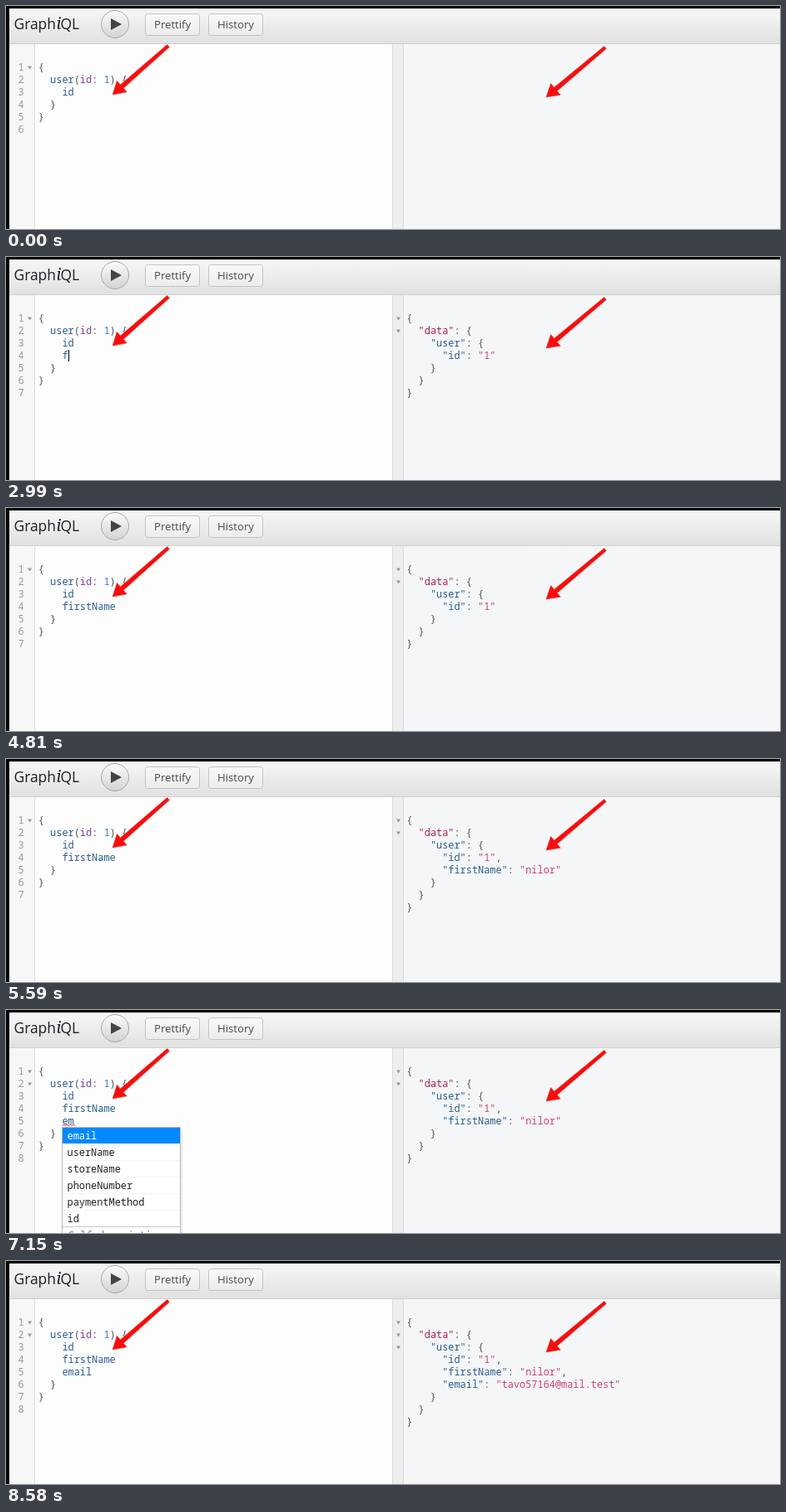
Animation of 930 by 269 pixels, one loop 9.23 s. Source, as an HTML page:

```html
<!DOCTYPE html>
<html lang="en">
<head>
<meta charset="utf-8">
<title>GraphiQL query demo</title>
<style>
  html, body { margin: 0; width: 100%; height: 100%; overflow: hidden; background: #000; }
  svg { display: block; width: 930px; height: 269px; }
  text { white-space: pre; }
  .ui { font: 13.2px "Open Sans", sans-serif; fill: #4a4a4a; }
  .logo { font: 17.4px "Open Sans", sans-serif; fill: #1d2029; }
  .logo .i { font: italic 19px "Noto Serif", serif; }
  .code { font: 11.92px "Noto Sans Mono", monospace; fill: #555; }
  .number { fill: #999; }
  .field { fill: #2b5c8e; }
  .attr { fill: #7f449f; }
  .int { fill: #3f78c0; }
  .root { fill: #ad1f50; }
  .string { fill: #cf4070; }
  .hint { fill: #222; }
  .active { fill: #fff; }
  .info { fill: #777; }
</style>
</head>
<body>
<svg viewBox="0 0 930 269">
  <defs>
    <linearGradient id="bar" x2="0" y2="1"><stop stop-color="#f6f6f6"/><stop offset="1" stop-color="#e1e1e1"/></linearGradient>
    <linearGradient id="round" x2="0" y2="1"><stop stop-color="#fbfbfb"/><stop offset="1" stop-color="#d2d3d6"/></linearGradient>
    <linearGradient id="button" x2="0" y2="1"><stop stop-color="#f9f9f9"/><stop offset="1" stop-color="#ececec"/></linearGradient>
  </defs>
  <rect width="930" height="269"/>
  <rect x="4" y="3" width="926" height="43" fill="url(#bar)"/>
  <path d="M4 45.5H930" stroke="#d0d0d0"/>
  <g class="logo">
    <text x="9.5" y="28">Graph</text><text class="i" x="60.5" y="28">i</text><text x="65.5" y="28">QL</text>
  </g>
  <circle cx="131" cy="22" r="16.5" fill="url(#round)" stroke="#a9a9a9"/>
  <path d="M126 15L139 22L126 29Z" fill="#444"/>
  <g fill="url(#button)" stroke="#c3c3c3">
    <rect x="167.5" y="9.5" width="65" height="26" rx="3"/>
    <rect x="243.5" y="9.5" width="65" height="26" rx="3"/>
  </g>
  <g class="ui"><text x="178" y="27">Prettify</text><text x="254" y="27">History</text></g>

  <rect x="4" y="46" width="31" height="223" fill="#f7f7f7"/>
  <rect x="35" y="46" width="430" height="223" fill="#fdfdfd"/>
  <rect x="465" y="46" width="13" height="223" fill="#eee"/>
  <rect x="478" y="46" width="452" height="223" fill="#f5f6f8"/>
  <path d="M34.5 46V269M464.5 46V269M477.5 46V269" stroke="#ddd"/>
  <g id="panes" class="code"></g>
  <g id="arrows" fill="#fa0c0c" stroke="#e04040" stroke-width=".6"></g>
  <g id="popup" class="code"></g>
</svg>
<script>
const LOOP = 9230, CHAR = 7.15, LINE = 15, LEFT = 38.8, RIGHT = 481.3;
const $ = id => document.getElementById(id);
const baseline = row => 78 + row * LINE;
const text = (x, y, body, cls = '') => `<text x="${x}" y="${y}" class="${cls}">${body}</text>`;
const span = (cls, body) => `<tspan class="${cls}">${body}</tspan>`;

const shortList = ['firstName', 'id'];
const eList = ['email', 'firstName', 'lastName', 'userName', 'storeName', 'phoneNumber'];
const emList = ['email', 'userName', 'storeName', 'phoneNumber', 'paymentMethod', 'id'];
const person = [['id', '1'], ['firstName', 'nilor'], ['email', 'tavo57164@mail.test']];

// Each step changes part of the state; fields are the lines inside user, shown is the number of result entries.
const steps = [
  [0, { fields: ['id'], shown: 0, caret: false, hints: null, bad: false, leftFolds: 1, rightFolds: 0 }],
  [1430, { shown: 1 }],
  [1950, { rightFolds: 2, caret: true }],
  [2470, { fields: ['id', ''] }],
  [2990, { fields: ['id', 'f'] }],
  [3120, { fields: ['id', 'fi'], hints: shortList }],
  [3640, { fields: ['id', 'firs'], bad: true, caret: false }],
  [4160, { fields: ['id', 'firstName'], hints: null, bad: false, caret: true }],
  [4810, { caret: false }],
  [5070, { shown: 0 }],
  [5590, { shown: 2 }],
  [6110, { fields: ['id', 'firstName', ''], caret: true }],
  [6370, { fields: ['id', 'firstName', 'e'] }],
  [6500, { hints: eList, leftFolds: 2 }],
  [7150, { fields: ['id', 'firstName', 'em'], hints: emList, bad: true, caret: false }],
  [7670, { fields: ['id', 'firstName', 'email'], hints: null, bad: false, caret: true }],
  [8060, { caret: false }],
  [8190, { shown: 0 }],
  [8580, { shown: 3, rightFolds: 3 }]
];

const paintQuery = line => line.replace(/(\w+)(?=:)|(\d+)|([a-z]+)/gi, (word, attr, int) =>
  span(attr ? 'attr' : int ? 'int' : 'field', word));

const paintResult = line => line.replace(/"[^"]*"(:?)/g, (word, colon) =>
  span(!colon ? 'string' : word === '"data":' ? 'root' : 'field', colon ? word.slice(0, -1) : word) + colon);

const codeLines = (x, lines, paint) => lines.map((line, row) => text(x, baseline(row), paint(line))).join('');

const folds = (x, count) => Array.from({ length: count }, (_, row) =>
  `<path d="M${x - 2.5} ${72.5 + row * LINE}h5l-2.5 4z" fill="#999"/>`).join('');

function drawPanes(s) {
  const query = ['{', '  user(id: 1) {', ...s.fields.map(f => '    ' + f), '  }', '}', ''];
  const entries = person.slice(0, s.shown).map(([key, value]) => `      "${key}": "${value}"`);
  const result = s.shown
    ? ['{', '  "data": {', '    "user": {', ...entries.join(',\n').split('\n'), '    }', '  }', '}']
    : [];
  const row = s.fields.length + 1, word = s.fields.at(-1);
  const startX = LEFT + 4 * CHAR, endX = startX + word.length * CHAR;
  let out = query.map((_, n) => text(14.5, baseline(n), n + 1, 'number')).join('');
  out += folds(28.5, s.leftFolds) + folds(471.5, s.rightFolds);
  out += codeLines(LEFT, query, paintQuery) + codeLines(RIGHT, result, paintResult);
  if (s.caret) out += `<rect x="${Math.round(endX)}" y="${baseline(row) - 11}" width="1" height="14" fill="#000"/>`;
  if (s.bad) {
    let wave = `M${startX} ${baseline(row) + 2}`;
    for (let x = 0; x < endX - startX - 1; x += 4) wave += 'l2 -2l2 2';
    out += `<path d="${wave}" fill="none" stroke="#e33"/>`;
  }
  return out;
}

function drawPopup({ fields, hints }) {
  if (!hints) return '';
  const top = baseline(fields.length + 1) + 4, listEnd = top + hints.length * 20 - .5;
  const items = hints.map((hint, n) =>
    (n ? `<path d="M68 ${top + n * 20 - .5}h141" stroke="#f3f3f3"/>` : '') +
    text(73.5, top + 14 + n * 20, hint, n ? 'hint' : 'active')).join('');
  return `<rect x="69" y="${top + 2}" width="143" height="${listEnd - top + 26}" fill="#000" opacity=".07"/>
    <rect x="67.5" y="${top - .5}" width="142" height="${listEnd - top + 26}" fill="#fff" stroke="#bbb"/>
    <rect x="68" y="${top}" width="141" height="19" fill="#08f"/>${items}
    <path d="M68 ${listEnd}h141" stroke="#c8c8c8"/>` + text(75, listEnd + 14, 'Self descriptive.', 'info');
}

function arrow(tailX, tailY, tipX, tipY) {
  const dx = tailX - tipX, dy = tailY - tipY, length = Math.hypot(dx, dy);
  const angle = Math.atan2(dy, dx) * 180 / Math.PI;
  return `<path transform="translate(${tipX} ${tipY}) rotate(${angle})"
    d="M0 0L15 -9V-2.8L${length} -2V2L15 2.8V9Z"/>`;
}

$('arrows').innerHTML = arrow(195, 48, 128, 107) + arrow(720, 50, 649, 110);

let current = -1;
function render(now) {
  const time = now % LOOP;
  const index = steps.findLastIndex(([start]) => start <= time);
  if (index !== current) {
    current = index;
    const state = Object.assign({}, ...steps.slice(0, index + 1).map(([, change]) => change));
    $('panes').innerHTML = drawPanes(state);
    $('popup').innerHTML = drawPopup(state);
  }
}

const origin = performance.now();
function tick() {
  render(performance.now() - origin);
  requestAnimationFrame(tick);
}
tick();
</script>
</body>
</html>
```
